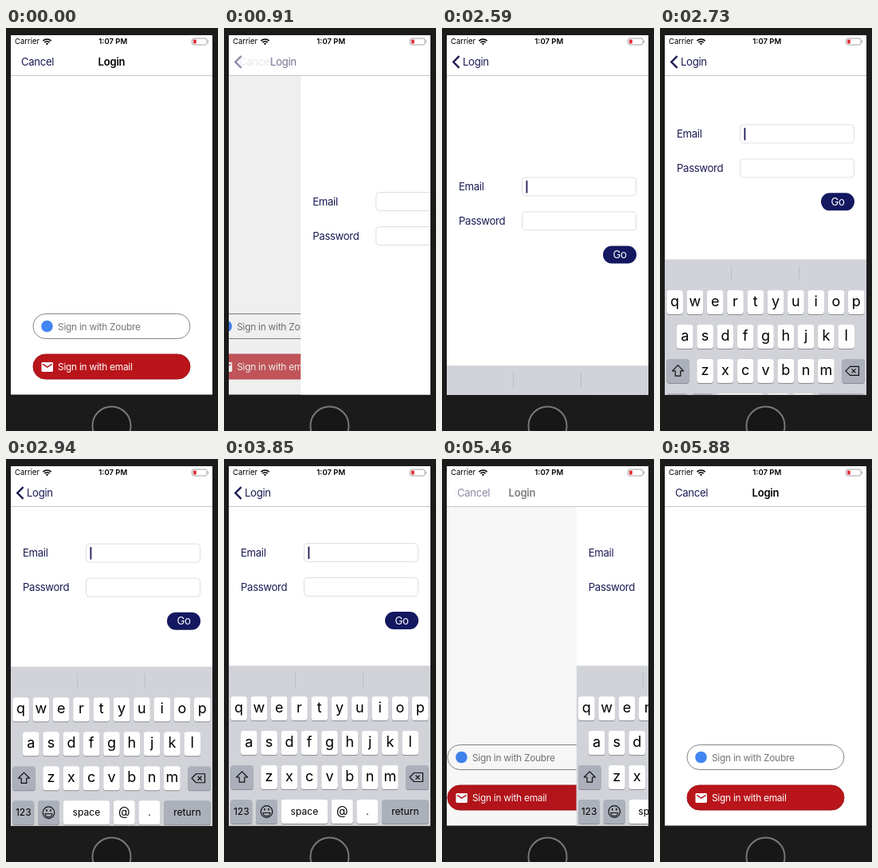
Write an HTML page that moves like this. It is 266 px wide and 504 px high and loops after 6.16 s.

```html
<!DOCTYPE html>
<html lang="en">
<head>
<meta charset="utf-8">
<title>Login flow</title>
<style>
  html, body { margin: 0; width: 100%; height: 100%; overflow: hidden; background: #1b1b1b; }
  svg { display: block; width: 266px; height: 504px; font-family: Inter, Roboto, sans-serif; }
  .mid { text-anchor: middle; }
  .nav { font-size: 13.2px; letter-spacing: -.35px; fill: #1b1b55; }
  .title { font-size: 13px; letter-spacing: -.2px; font-weight: 600; }
  .status { font-size: 9.5px; }
  .button { font-size: 11.9px; letter-spacing: -.25px; }
  .field { fill: #fff; stroke: #dedee2; }
  .letter { font-size: 18px; }
  .word { font-size: 12.1px; }
</style>
</head>
<body>
<svg viewBox="0 0 266 504">
  <defs>
    <clipPath id="screen"><rect x="6" y="9" width="253" height="449.5"/></clipPath>
  </defs>
  <rect width="266" height="504" fill="#1b1b1b"/>
  <circle cx="132.5" cy="497.5" r="24" fill="#171717" stroke="#777" stroke-width="2"/>

  <g clip-path="url(#screen)">
    <rect x="6" y="9" width="253" height="450" fill="#fff"/>

    <g id="loginPage">
      <rect x="34" y="357.5" width="197" height="31" rx="15.5" fill="#fff" stroke="#858585"/>
      <circle cx="51.5" cy="373" r="7.3" fill="#4285f4"/>
      <text class="button" x="65" y="377.5" fill="#757575">Sign in with Zoubre</text>
      <g id="emailButton">
        <rect x="34" y="408" width="197" height="31" rx="15.5" fill="#b9151b" stroke="#a01318"/>
        <rect x="44.5" y="418" width="14.5" height="12" rx="1.4" fill="#fff"/>
        <path d="M46 420.3l5.8 3.8 5.8-3.8" fill="none" stroke="#b9151b" stroke-width="1.4"/>
        <text class="button" x="65" y="428" fill="#fff">Sign in with email</text>
      </g>
      <rect id="dim" x="6" y="60" width="253" height="399"/>
    </g>

    <g id="formPage">
      <rect x="6" y="60" width="253" height="399" fill="#fff"/>
      <g id="form">
        <text class="nav" x="21" y="221.7">Email</text>
        <rect class="field" x="100.5" y="205.5" width="143" height="23" rx="4"/>
        <rect id="cursor" x="105.5" y="209.5" width="1.8" height="15.5" fill="#1b1b55"/>
        <text class="nav" x="21" y="264.5">Password</text>
        <rect class="field" x="100.5" y="248.5" width="143" height="23" rx="4"/>
        <rect x="202" y="291" width="42" height="22" rx="11" fill="#131860"/>
        <text class="nav mid" x="223" y="306.7" style="fill:#fff">Go</text>
      </g>
      <g id="keyboard">
        <rect x="6" y="258.5" width="253" height="201" fill="#d1d3d9"/>
        <path d="M89.5 267v19M174.5 267v19" stroke="#bcbfc6"/>
        <g id="keys"></g>
        <g fill="none" stroke="#111" stroke-width="1.2" stroke-linejoin="round">
          <path d="M22.5 390.8l7 7.2h-3.7v6.2h-6.6V398h-3.7z"/>
          <path d="M238.5 392.5h11v11h-11l-5.5-5.5zM240.5 395.5l5 5m0-5l-5 5"/>
          <circle cx="53.5" cy="441" r="7.3"/>
          <path d="M49 442.5h9a4.5 4 0 0 1-9 0z"/>
          <path d="M51 437v2.4M56 437v2.4" stroke-width="1.5"/>
        </g>
      </g>
    </g>

    <rect x="6" y="9" width="253" height="51" fill="#fff"/>
    <path d="M6 59.5h253" stroke="#c6c6c8"/>
    <text class="status" x="11" y="20.3">Carrier</text>
    <g fill="none" stroke="#000" stroke-width="1.7">
      <path d="M46.4 16.1a7.2 7.2 0 0 1 10.2 0M48.4 18.2a4.4 4.4 0 0 1 6.2 0"/>
      <path d="M51.5 21.2l-1.6-1.7a2.3 2.3 0 0 1 3.2 0z" fill="#000" stroke="none"/>
    </g>
    <text class="status mid" x="134.3" y="20.3" font-weight="600">1:07 PM</text>
    <rect x="233.5" y="13" width="18.5" height="8" rx="2" fill="#fff" stroke="#a3a3a3"/>
    <rect x="235" y="14.5" width="3.8" height="5" rx=".7" fill="#e0303a"/>
    <path d="M253.3 15.5q1.6 1.5 0 3z" fill="#a3a3a3" stroke="#a3a3a3" stroke-width=".5"/>

    <text id="cancel" class="nav" x="19" y="47.2">Cancel</text>
    <text id="title" class="title mid" x="132.5" y="47.2">Login</text>
    <path id="chevron" d="M21.6 35.2l-7.3 7.3 7.3 7.3" fill="none" stroke="#1b1b55" stroke-width="2.4"/>
    <text id="back" class="nav" x="26" y="47.2">Login</text>
  </g>
</svg>
<script>
const LOOP = 6160, STEP = 70;
const PUSH = 790, KEYBOARD = 2547, POP = 5340, BACK_TAP = 5250;
const WIDTH = 253, TITLE_SHIFT = 90;
const LIGHT = '#fff', GREY = '#abb0ba';
const el = id => document.getElementById(id);

function keyMarkup(label, x, y, width, fill, style) {
  const baseline = y + (style === 'letter' ? 19.7 : 19.2);
  return `<rect x="${x}" y="${y + 1}" width="${width}" height="30" rx="3.6" fill="#8b8d92"/>
    <rect x="${x}" y="${y}" width="${width}" height="30" rx="3.6" fill="${fill}"/>
    <text class="mid ${style}" x="${x + width / 2}" y="${baseline}">${label}</text>`;
}

function letterRow(letters, x, y) {
  return [...letters].map((c, i) =>
    keyMarkup(c, x + i * 25.3, y, 20.6, LIGHT, 'letter')).join('');
}

el('keys').innerHTML =
  letterRow('qwertyuiop', 8.3, 297) +
  letterRow('asdfghjkl', 21, 340) +
  letterRow('zxcvbnm', 46.3, 383) +
  keyMarkup('', 8.3, 383, 28.5, GREY, 'word') +
  keyMarkup('', 228.3, 383, 28.5, GREY, 'word') +
  keyMarkup('123', 8.3, 426, 27, GREY, 'word') +
  keyMarkup('', 40, 426, 27, GREY, 'word') +
  keyMarkup('space', 71.7, 426, 58.5, LIGHT, 'word') +
  keyMarkup('@', 134.8, 426, 27, LIGHT, 'letter" style="font-size:15px') +
  keyMarkup('.', 166.4, 426, 27, LIGHT, 'word') +
  keyMarkup('return', 198, 426, 58.8, GREY, 'word');

// Critically damped spring from 0 to 1.
function spring(ms) {
  if (ms <= 0) return 0;
  const a = ms * 0.01826;
  return 1 - (1 + a) * Math.exp(-a);
}

// Linear interpolation through [time, value] points.
function track(t, points) {
  const i = points.findIndex(p => p[0] > t);
  if (i === 0) return points[0][1];
  if (i < 0) return points[points.length - 1][1];
  const [t0, v0] = points[i - 1], [t1, v1] = points[i];
  return v0 + (v1 - v0) * (t - t0) / (t1 - t0);
}

const buttonFade = [[530, 1], [680, 0.2], [760, 0.2], [1000, 1]];
const cursorFade = [
  [2550, 0], [2551, 1], [3170, 1], [3360, 0], [3600, 0], [3850, 1],
  [4150, 1], [4340, 0], [4640, 0], [4760, 1], [5190, 1], [5310, 0]
];

function move(id, x, y = 0) {
  el(id).setAttribute('transform', `translate(${x.toFixed(2)} ${y.toFixed(2)})`);
}

function fade(id, opacity) {
  el(id).setAttribute('opacity', Math.max(0, Math.min(1, opacity)).toFixed(3));
}

function draw(t) {
  const popped = t >= PUSH + 4000;
  const page = popped ? 1 - spring(t - POP) : spring(t - PUSH);
  const raised = spring(t - KEYBOARD);
  const backOpacity = t >= BACK_TAP ? 0.22 : 1;

  move('loginPage', -0.3 * WIDTH * page);
  move('formPage', WIDTH * (1 - page));
  move('form', 0, -100 * raised);
  move('keyboard', 0, 201 * (1 - raised));
  fade('dim', 0.1 * page);
  fade('emailButton', track(t, buttonFade));
  fade('cursor', track(t, cursorFade));

  move('title', -TITLE_SHIFT * page);
  move('back', TITLE_SHIFT * (1 - page));
  fade('title', 1 - page * 1.4);
  fade('cancel', 1 - page * 1.4);
  fade('back', (page * 1.4 - 0.4) * backOpacity);
  fade('chevron', (page * 1.4 - 0.4) * backOpacity);
}

const start = performance.now();
function frame() {
  const t = (performance.now() - start) % LOOP;
  draw(Math.floor(t / STEP) * STEP);
  requestAnimationFrame(frame);
}
frame();
</script>
</body>
</html>
```
